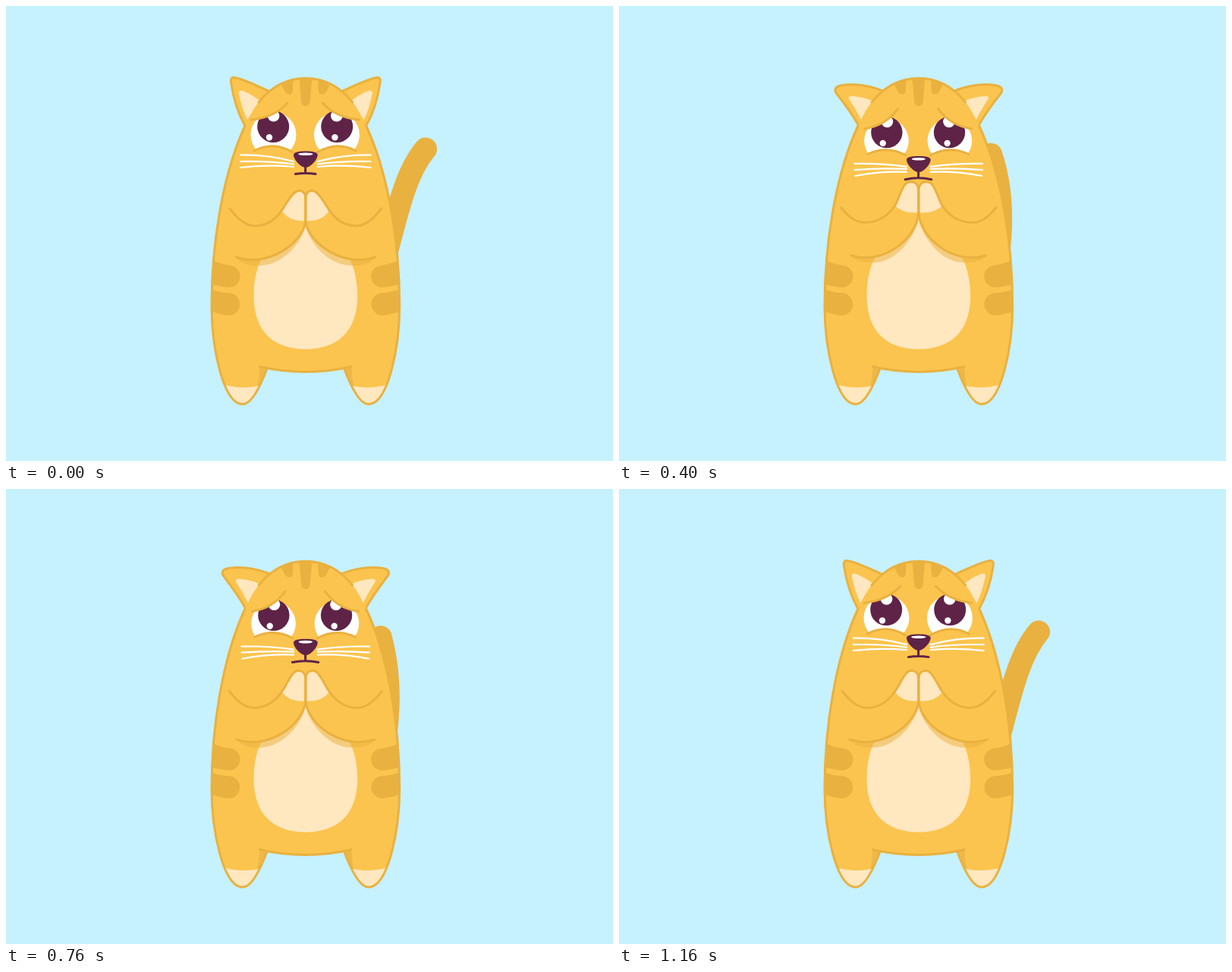
An HTML page for the animation above (1200 ms loop, 800 by 600 pixels).

```html
<!DOCTYPE html>
<html lang="en">
<head>
<meta charset="utf-8">
<title>Pleading cat</title>
<style>
  html, body { margin: 0; height: 100%; overflow: hidden; background: #c6f1ff; }
  svg { display: block; width: 100%; height: 100%; }
</style>
</head>
<body>
<svg id="cat" viewBox="0 0 800 600" fill="none" stroke-linecap="round" stroke-linejoin="round"></svg>
<script>
const LOOP = 1200, STEP = 40;
const FUR = '#fbc44e', DARK = '#e9b13f', CREAM = '#ffe7c0', PLUM = '#5f2347';

// Blend two paths that differ only in their numbers
function mix(a, b, k) {
  const to = b.match(/-?[\d.]+/g);
  let i = 0;
  return a.replace(/-?[\d.]+/g, n => (+n + (to[i++] - n) * k).toFixed(2));
}
const fill = (d, color, extra = '') => `<path d="${d}" fill="${color}" ${extra}/>`;
const line = (d, color = DARK, width = 3) =>
  `<path d="${d}" stroke="${color}" stroke-width="${width}"/>`;
const circle = (x, y, r, color) => `<circle cx="${x}" cy="${y}" r="${r}" fill="${color}"/>`;
const flip = (s, span = 789.7) => `<g transform="matrix(-1 0 0 1 ${span} 0)">${s}</g>`;
const both = s => s + flip(s);
const smooth = u => { u = Math.min(1, Math.max(0, u)); return u * u * (3 - 2 * u); };
// Ease up from 0 ms, then back down from 600 ms
const swing = (t, rise, fall) => smooth(t / rise) - smooth((t - 600) / fall);

const HEAD = 'M394.9 95.3C370 95.3 349 107 333 127';
const SIDE = 'C285 223 271 315 271 395C271 450 286 525 312 525C324 525 335 502 344 478';
const BODY = HEAD + 'C326 135 321 146 315 158' + SIDE + 'Q369 482.5 396 482.5V95.3Z';

const torso = `<clipPath id="body"><path d="${BODY}"/></clipPath>` + both(fill(BODY, FUR)) + both(
  '<g clip-path="url(#body)">' +
  fill('M274 336Q285 341 295 342A14.5 14.5 0 0 1 293 371Q283 370.5 268 366Z', DARK) +
  fill('M268 373Q283 378 294 378.5A14.7 14.7 0 0 1 293 408Q282 407 268 402Z', DARK) +
  fill('M335 475L346 479L334 501H331C334 491 333 482 335 475Z', '#edb848') +
  fill('M280 497Q311 508 340 499V530H280Z', CREAM) +
  fill('M386.5 95L389 126Q389.5 132 395.5 132V95Z', DARK) +
  fill('M362 102L367 112Q370 117 374.5 116.5Q378 115.5 378 110L378.5 96Z', DARK) +
  '</g>' +
  fill('M395.5 268C362 298 326.5 322 326.5 382C326.5 420 344 452.5 395.5 452.5Z', CREAM) +
  line(HEAD) + line('M315 158' + SIDE) + line('M334.5 475.5Q364 482.5 394.9 482.5'));

function tail(p) {
  return line(mix('M553 188.5C528 218 518 262 499 335',
                  'M479 197C495 226 507 270 499 335', p), DARK, 30);
}

function ears(p) {
  const ear = mix('M348 113C330 105 315 97 302 94.5Q295.5 93.5 296.5 100C300 125 306 142 315 158',
                  'M348 112C330 104 308 103 291 106.5Q280 109 284 117C294 126 305 138 315 156', p);
  const inner = mix('M336 126Q324 116 311 111.5Q306 111 307 116Q311 136 318 150',
                    'M336 126Q322 120 305 120Q300 121 303 125Q312 135 319 150', p);
  return both(fill(ear + 'L345 150Z', FUR) + fill(inner + 'Z', CREAM) + line(ear));
}

function eyes(p) {
  const brow = mix('M323 150C345 148 360 140 371 128', 'M324 164C345 160 357 151 367 137', p);
  const cheek = mix('M327 191Q353 177.5 378 193', 'M328 196Q353 184.5 378 197.5', p);
  const open = mix('M318 151L323 150C345 148 360 140 371 128H390V193H378Q353 177.5 327 191H318Z',
                   'M318 165L324 164C345 160 357 151 367 137H390V197.5H378Q353 184.5 328 196H318Z', p);
  const y = 159 + 9 * p;
  const eye = small =>
    '<g clip-path="url(#open)">' +
    circle(352.5, 170 + 9 * p, 30 - 0.8 * p, '#fff') +
    circle(352.2 + 0.8 * p, y, 21 - 0.4 * p, PLUM) +
    circle(352.6 + p, y - 14.2, 7.8, '#fff') + circle(small + 0.9 * p, y + 14.3, 4.2, '#fff') +
    '</g>' + line(brow) + line(cheek);
  return `<clipPath id="open"><path d="${open}"/></clipPath>` + eye(347) + flip(eye(355), 788.4);
}

function muzzle(p) {
  const whiskers = mix('M309 196.5Q345 196 379 205M309 205Q345 204 379 208.5M309 213Q345 209 379 212',
                       'M311 210Q345 209 379 213M311 218Q345 215 379 216M312 226Q345 219 379 220', p);
  const nose = mix('M395.2 191.5C383 191.5 379 193.5 379 196.5C379 202 388 213 395.2 213Z',
                   'M395.2 199.2C383 199.2 379 201 379 204C379 209.5 388 220.5 395.2 220.5Z', p);
  const mouth = mix('M394.6 210V220M381.5 221.5Q394.6 219.5 408 221.5',
                    'M394.6 218V228M376.5 230Q394.6 226 412.5 230', p);
  return both(line(whiskers, '#fff', 2.2) + fill(nose, PLUM)) + line(mouth, PLUM, 3) +
    `<ellipse cx="394.8" cy="${195.2 + 7.8 * p}" rx="${9.7 - 0.7 * p}" ry="1.8" fill="#fff"/>`;
}

function arms(k) {
  const hand = mix('C372 256 376 250 379 247.5C382 244 386 243 388.5 243.8C393 245 394.6 248 394.6 253',
                   'C369 252 372 243 376 236.5C379 232.5 383 231 387 232C392 233 394.6 237 394.6 243', k);
  const upper = mix('M295 267C306 282 316 290 328 290C350 290 361 274 367 264',
                    'M293 266C304 280 313 285.5 324 285.5C345 285.5 357 274 365 261', k) + hand;
  const lower = mix('V284C392 312 345 346 303 331', 'V274C392 306 350 342 306 329', k);
  const paw = mix('M363.5 270L367 264', 'M363 263L365 261', k) + hand +
              mix('V283Q374 285 363.5 270Z', 'V272Q376 275 363 263Z', k);
  const shade = mix('M303 331C310 342 325 343 338 342C365 340 388 315 394.6 290V280Z',
                    'M306 329C313 338 326 339 340 338C366 335 388 308 394.6 282V272Z', k);
  return both(fill(shade, DARK, 'opacity=".5"')) +
    both(fill(upper + lower + 'Z', FUR) + fill(paw, CREAM) + line(upper + lower));
}

const svg = document.getElementById('cat');
function draw(now) {
  const t = Math.floor(now % LOOP / STEP) * STEP;
  const droop = swing(t, 530, 600);
  const lift = (1 - Math.cos(t / 240 * 2 * Math.PI)) / 1.5;
  svg.innerHTML = tail(swing(t, 530, 560)) + ears(droop) + torso +
    eyes(droop) + muzzle(droop) + arms(lift);
  requestAnimationFrame(draw);
}
draw(0);
</script>
</body>
</html>
```
